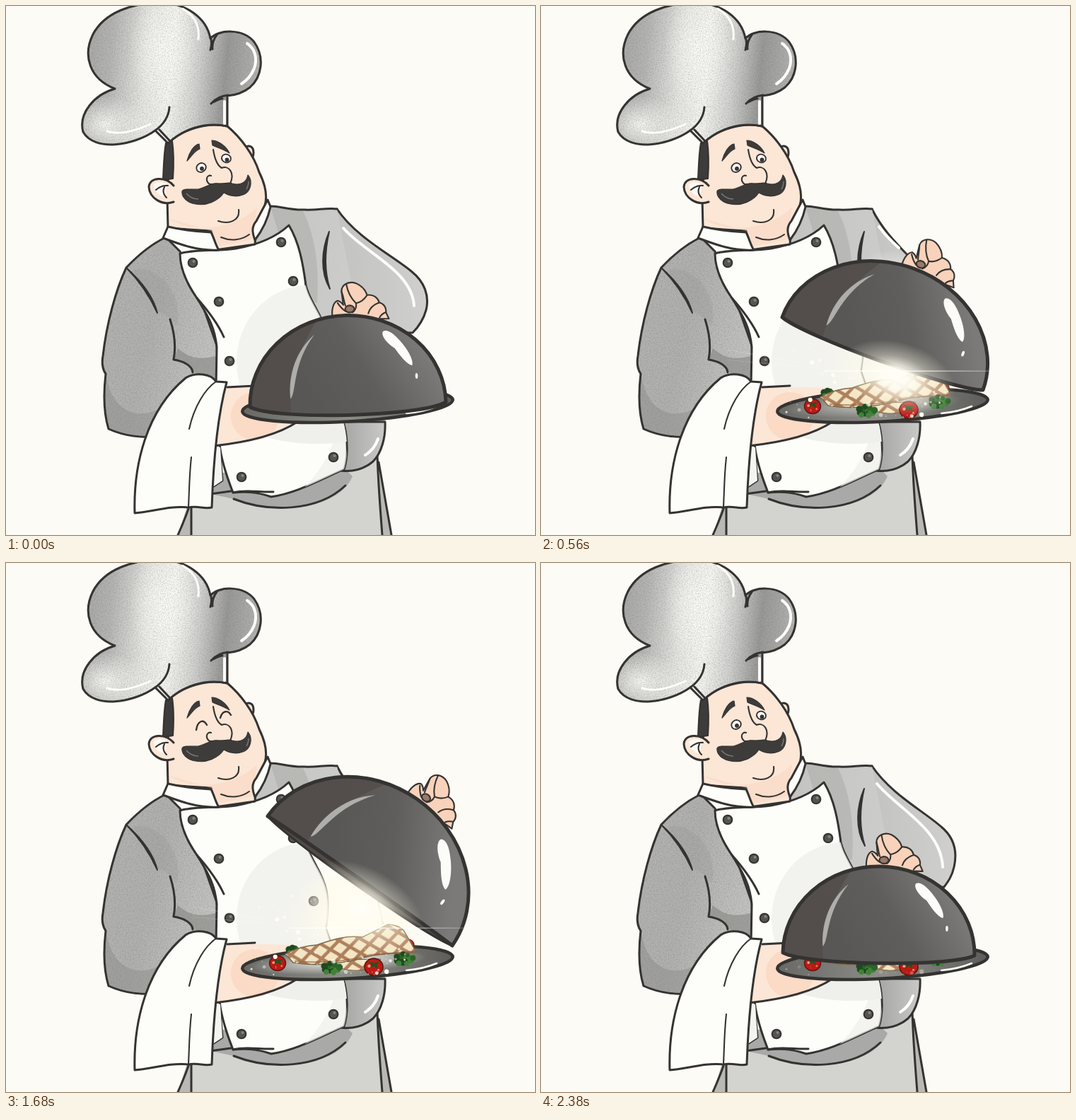
An HTML page for the animation above (2520 ms loop, 748x748 px).

```html
<!DOCTYPE html>
<html lang="en">
<head>
<meta charset="utf-8">
<title>Chef lifting a cloche</title>
<style>
html, body { margin: 0; width: 100%; height: 100%; overflow: hidden; background: #fcfbf6; }
svg { display: block; width: 100vw; height: 100vh; }
.o { stroke: #343331; stroke-width: 3; stroke-linecap: round; stroke-linejoin: round; }
.l { fill: none; }
.t { stroke-width: 2.1; }
.w { fill: none; stroke: #fdfdfa; stroke-width: 4; stroke-linecap: round; }
.skin { fill: #fce6d6; }
.white { fill: #fdfdf9; }
.ink { fill: #3d3c3b; }
.lit { opacity: var(--lit); }
</style>
</head>
<body>
<svg id="stage" viewBox="0 0 748 748">
<defs>
  <linearGradient id="hat" gradientUnits="userSpaceOnUse" x1="108" y1="60" x2="362" y2="85">
    <stop offset="0" stop-color="#a6a6a4"/><stop offset=".16" stop-color="#b6b6b4"/>
    <stop offset=".36" stop-color="#e6e6e3"/><stop offset=".5" stop-color="#f5f5f1"/>
    <stop offset=".65" stop-color="#d2d2d0"/><stop offset=".8" stop-color="#999997"/>
    <stop offset="1" stop-color="#b6b6b4"/>
  </linearGradient>
  <radialGradient id="puff"><stop offset="0" stop-color="#fafaf6" stop-opacity=".9"/><stop offset="1" stop-color="#fafaf6" stop-opacity="0"/></radialGradient>
  <linearGradient id="coat" x1="0" y1=".2" x2="1" y2=".6">
    <stop offset="0" stop-color="#b3b3b1"/><stop offset=".45" stop-color="#b1b1af"/><stop offset="1" stop-color="#c6c6c4"/>
  </linearGradient>
  <linearGradient id="sleeve" x1="0" y1="0" x2="1" y2="0"><stop offset="0" stop-color="#c3c3c1"/><stop offset="1" stop-color="#cfcfcd"/></linearGradient>
  <linearGradient id="hip" x1="0" y1="0" x2="1" y2="0"><stop offset="0" stop-color="#a2a2a0"/><stop offset="1" stop-color="#c9c9c7"/></linearGradient>
  <linearGradient id="metal" gradientUnits="userSpaceOnUse" x1="-50" y1="0" x2="100" y2="-90">
    <stop offset="0" stop-color="#585755"/><stop offset=".5" stop-color="#5f5e5c"/><stop offset="1" stop-color="#7b7a78"/>
  </linearGradient>
  <linearGradient id="dish" x1="0" y1="0" x2="1" y2="0"><stop offset="0" stop-color="#686865"/><stop offset=".5" stop-color="#8d8d88"/><stop offset="1" stop-color="#5d5d5b"/></linearGradient>
  <radialGradient id="glow">
    <stop offset="0" stop-color="#fffef8"/><stop offset=".28" stop-color="#fffdf2" stop-opacity=".93"/>
    <stop offset=".6" stop-color="#fffbe9" stop-opacity=".4"/><stop offset="1" stop-color="#fffbe9" stop-opacity="0"/>
  </radialGradient>
  <radialGradient id="halo"><stop offset=".7" stop-color="#fefdf9"/><stop offset="1" stop-color="#fefdf9" stop-opacity="0"/></radialGradient>
  <linearGradient id="ray"><stop offset="0" stop-color="#fff" stop-opacity="0"/><stop offset=".5" stop-color="#fff"/><stop offset="1" stop-color="#fff" stop-opacity="0"/></linearGradient>
  <filter id="grain" x="0" y="0" width="1" height="1" color-interpolation-filters="sRGB">
    <feTurbulence type="fractalNoise" baseFrequency=".6" numOctaves="3" seed="4"/>
    <feColorMatrix values="0 0 0 0 .35  0 0 0 0 .35  0 0 0 0 .34  .6 0 0 0 -.25"/>
    <feComposite operator="in" in2="SourceGraphic" result="n"/>
    <feMerge><feMergeNode in="SourceGraphic"/><feMergeNode in="n"/></feMerge>
  </filter>
  <pattern id="grill" width="28" height="22" patternUnits="userSpaceOnUse" patternTransform="rotate(-8)">
    <rect width="28" height="22" fill="#f3e6c4"/>
    <path d="M0 0L28 22M28 0L0 22" stroke="#9c6542" stroke-width="4.6" opacity=".8"/>
  </pattern>
  <clipPath id="bibClip"><use href="#bib"/></clipPath>
  <clipPath id="hatClip"><use href="#crown"/></clipPath>
  <clipPath id="domeClip"><path id="domeCut"/></clipPath>
  <path id="crown" d="M229 194L211 176C180 198 125 206 109 178C102 152 125 125 154 117C118 103 108 70 123 40C140 8 180 -4 215 -4C255 -6 284 18 289 46C300 33 335 31 351 51C366 72 362 100 345 115C335 123 325 126 313 127L313 170C280 163 250 175 229 194Z"/>
  <path id="jacket" d="M226 327C205 337 186 353 170 370C155 402 142 450 137 495C135 505 137 515 141 520C138 545 138 575 145 598C165 607 190 613 235 607L303 560L298 480L270 400L246 347Z"/>
</defs>
<rect width="748" height="748" fill="#fcfbf6"/>

<!-- trousers -->
<path d="M262 690L262 748L531 748L525 630Z" fill="#d3d3cf"/>
<path d="M262 690L243 748L262 748ZM525 634L532 748L545 748Z" fill="#b8b8b4"/>
<path class="o l" d="M258 711Q252 728 243 748M262 708V748M525 634C526 670 529 710 532 748M527 645L545 748"/>

<!-- right side of the coat and raised arm -->
<path id="arm" class="o" fill="url(#sleeve)"/>
<path id="shine" class="w" stroke-width="6"/>
<path d="M350 330L374 283C388 283 402 289 422 288C438 289 455 285 468 287L490 400L520 460L533 510L536 590L440 600Z" fill="url(#sleeve)"/>
<path d="M374 284L420 290Q445 340 440 420L425 415L418 350L400 311L385 320Z" fill="#b2b2b0" opacity=".7"/>
<path class="o l" d="M374 283C388 283 402 289 422 288C438 289 455 285 468 287"/>
<path class="o" fill="#343331" d="M457 319C446 345 444 376 458 400C450 375 451 345 457 319Z" style="stroke-width:2"/>
<ellipse class="lit" cx="496" cy="462" rx="88" ry="118" fill="url(#halo)"/>
<path class="o l t" d="M523 465L533 510"/>

<!-- left side of the coat -->
<use href="#jacket" fill="url(#coat)" filter="url(#grain)"/>
<path d="M141 520C138 545 138 575 145 598C165 607 190 612 205 607L216 570C185 585 150 575 141 520Z" fill="#858583" opacity=".4"/>
<path d="M264 517C262 507 250 502 237 500L243 484Q265 504 296 495L298 532Z" fill="#858583" opacity=".6"/>
<path d="M180 374C195 365 225 380 238 410C250 440 240 465 235 443L212 430Z" fill="#878785" opacity=".2"/>
<use href="#jacket" class="o l"/>
<path class="o l" d="M232 443C239 465 240 485 237 500C250 502 263 508 264 518"/>
<path class="o" fill="#343331" style="stroke-width:2" d="M170 370C190 388 208 410 214 434C204 412 190 390 170 370Z"/>

<!-- hem and bib -->
<path d="M290 690L304 660L480 655L490 665C470 712 380 722 322 697Z" fill="#a9a9a7"/>
<path class="o l" d="M322 697C370 716 440 716 480 678"/>
<path class="o" fill="url(#hip)" d="M470 588L536 588C537 610 531 632 519 644C506 655 490 659 474 657Z"/>
<path class="w" d="M526 612Q521 627 508 635"/>
<path id="bib" class="o white" d="M246 350C270 343 300 347 325 343C360 337 385 324 400 310C415 335 420 365 424 395C429 418 447 435 453 463C457 482 455 500 452 516L478 592C484 615 483 640 478 655C440 672 410 689 375 694C352 686 335 687 321 688C312 665 304 640 302 620L297 540L298 482C295 452 285 438 270 413C256 393 246 372 246 350Z"/>
<g clip-path="url(#bibClip)" fill="#efefec">
  <ellipse cx="428" cy="503" rx="102" ry="108" opacity=".75"/>
  <ellipse cx="440" cy="580" rx="110" ry="39"/>
  <path d="M478 592L484 660L420 683Q462 640 470 590Z" opacity=".7"/>
</g>
<path class="o l" d="M270 413C285 430 300 450 308 468M321 688C340 683 358 688 378 687"/>
<g id="buttons"></g>

<!-- forearm and cloth -->
<path class="skin" d="M312 538L410 540L412 588C388 606 350 617 292 622Z"/>
<circle cx="352" cy="580" r="34" fill="#f6c6ab" opacity=".38"/>
<path class="o l" d="M313 539L352 537M294 622C340 617 385 606 412 588M302 625L306 671L291 681M289 690L318 686"/>
<path d="M294 622L303 624L306 671L291 681Z" fill="#f4f4f1"/>
<path class="o white" d="M182 717C180 650 198 572 254 526C268 517 290 520 297 531L312 532C303 565 294 620 291 709C280 712 272 706 258 709C230 706 205 716 182 717Z"/>
<path class="o l t" d="M297 531C282 541 266 566 259 598M262 638C259 665 259 690 258 708"/>

<!-- head -->
<path class="o skin" d="M337 203C340 195 350 197 350 207C350 215 346 218 342 216"/>
<path class="o skin" d="M232 190C250 176 285 163 313 170C332 186 350 210 358 235C367 253 370 268 366 282L354 305L352 337L296 345L290 318L229 314L228 272Z"/>
<path d="M229 300C260 322 320 318 355 285L348 330L300 340L290 318Z" fill="#f6cfb6" opacity=".4"/>
<path class="o white" d="M229 312C250 317 270 319 290 320C295 330 297 340 301 345C272 347 246 337 222 328Z"/>
<path class="o white" d="M370 274L374 284C370 302 362 318 352 331C348 320 347 312 354 304Z"/>
<path class="ink o t" d="M226 194L235 191C238 212 237 230 236 244L222 246C223 228 223 210 226 194Z"/>
<path class="o skin" d="M237 254C226 241 203 241 202 256C203 271 220 283 237 277"/>
<path d="M209 252Q218 246 228 252L224 270Q210 266 209 252Z" fill="#fff9f3"/>
<path class="o l t" d="M212 260Q220 253 229 254M224 256Q220 264 227 271M300 304C315 309 331 304 329 288M304 327C318 333 333 331 344 323"/>
<path class="ink o" style="stroke-width:1.2" d="M256 219C259 207 266 196 273 195L274 202C266 205 262 213 256 219ZM291 190C300 190 311 198 316 208C306 202 298 200 292 197Z"/>
<g id="open" class="o" style="stroke-width:1.9">
  <ellipse fill="#fefefc" cx="276" cy="228.5" rx="7" ry="6.2" transform="rotate(-35 276 228.5)"/><circle class="ink" cx="277" cy="230" r="2"/>
  <ellipse fill="#fefefc" cx="311.500" cy="215.500" rx="6.600" ry="5.800" transform="rotate(20 311.5 215.500)"/><circle class="ink" cx="312.500" cy="217.500" r="2"/>
</g>
<path id="happy" class="o l" style="stroke-width:2.4" d="M269 236C271 223 279 220 284 229M303 219C306 208 314 208 318 215"/>
<path class="o skin t" d="M293 203C295 216 298 225 305 229C315 225 324 236 317 251L288 252C280 246 285 238 290 240"/>
<path class="ink o" style="stroke-width:1.2" d="M249 262C251 257 262 260 272 259C284 256 291 249 300 251C307 253 312 248 320 251C331 254 340 250 342 239C349 247 347 263 335 267C324 271 315 268 308 264C300 276 283 283 268 280C256 278 248 270 249 262Z"/>
<path d="M255 265C260 271 266 273 272 273M340 259Q343 254 343 248" fill="none" stroke="#777" stroke-width="1.5"/>

<!-- hat -->
<g filter="url(#grain)"><g clip-path="url(#hatClip)">
  <use href="#crown" fill="url(#hat)"/>
  <ellipse cx="140" cy="168" rx="56" ry="42" fill="url(#puff)"/>
  <ellipse cx="222" cy="62" rx="48" ry="85" fill="url(#puff)"/>
</g></g>
<use href="#crown" class="o l"/>
<path class="o l" d="M289 44Q292 52 289 62M298 41Q291 50 292 61M290 138C297 130 305 127 314 126M293 136Q302 131 306 131M231 143C230 158 222 168 211 176M217 175L231 190"/>
<path class="w" d="M341 53C352 60 356 74 351 88C347 98 341 105 333 110M309 135V166"/>
<path class="w" style="stroke-width:3" d="M143 177C160 183 184 176 204 167M250 4C266 13 274 28 272 47"/>

<!-- plate and meal -->
<g transform="rotate(-3.2 483 565)">
  <ellipse class="o" cx="483" cy="565" rx="149" ry="22.500" fill="url(#dish)" style="stroke-width:4.5"/>
  <ellipse class="lit" cx="470" cy="563" rx="125" ry="17" fill="url(#puff)"/>
</g>
<path class="w" style="stroke-width:2.5" d="M566 576Q590 574 609 566"/>
<ellipse class="lit" cx="490" cy="505" rx="112" ry="72" fill="url(#glow)"/>
<g id="food">
  <g id="rear"></g>
  <path d="M440 562L530 560L522 573Q490 580 470 572Z" fill="url(#grill)" stroke="#7d5a3c"/>
  <path d="M395 553C410 544 425 541 440 540C458 534 478 526 504 529L540 511Q555 512 562 519L580 550C560 553 535 550 510 557C480 566 440 571 406 565Z" fill="url(#grill)" stroke="#7d6745" stroke-width="1.5"/>
  <path d="M408 563Q470 568 515 554L578 549" fill="none" stroke="#8a5a38" stroke-width="2" opacity=".6"/>
  <g id="front"></g>
</g>
<g id="sparks" fill="#fffef4"></g>

<!-- cloche -->
<g id="dome">
  <g id="hand" class="o t">
    <path fill="#f8d2ba" d="M-25 -34C-25 -44 -14 -49 -4 -45C4 -41 9 -35 11 -28C20 -29 26 -24 28 -17C35 -15 38 -9 37 -3L41 6L-38 6C-41 -8 -37 -19 -31 -21C-27 -20 -25 -18 -23 -15Z"/>
    <path class="l" d="M-25 -34C-22 -25 -22 -20 -20 -14M-18 -44C-16 -32 -12 -24 -5 -17M11 -28C7 -22 2 -18 -5 -17C-4 -11 -6 -7 -10 -4M28 -17C19 -14 14 -9 12 -2M37 -3Q31 -1 28 4M-31 -18Q-26 -10 -20 -6"/>
    <ellipse cx="-14" cy="-9" rx="6.500" ry="5" fill="#98796a"/>
  </g>
  <path id="inside" class="o" fill="#514a47"/>
  <g id="motes" fill="#fff"></g>
  <path id="shell" fill="url(#metal)"/>
  <g clip-path="url(#domeClip)"><g id="marks">
    <path d="M-160 40V-140H-28C-62 -90 -82 -50 -81 -5L-80 40Z" fill="#504845" opacity=".6"/>
    <path d="M-45 -100C-70 -80 -84 -45 -81 -10C-72 -18 -78 -58 -45 -100Z" fill="#aeaeab"/>
    <path d="M52 -102C58 -106 68 -98 76 -88C88 -74 95 -58 92 -53C84 -55 75 -68 68 -78C56 -86 49 -97 52 -102Z" fill="#fbfbf8"/>
    <ellipse cx="98" cy="-38" rx="1.800" ry="4" fill="#fbfbf8"/>
  </g></g>
  <path id="edge" class="o l" style="stroke-width:5"/>
</g>
<ellipse id="flare" fill="url(#glow)"/>
<path id="rays" fill="url(#ray)" d="M250 483L400 510L250 484.500ZM262 500L420 514L262 501ZM400 515.500H690V517H400Z"/>
<g id="facial" fill="#fff">
  <circle cx="270" cy="242" r="2"/><circle cx="281" cy="271" r="2.600"/><circle cx="348" cy="268" r="2"/><circle cx="268" cy="266" r="1.400"/><circle cx="333" cy="297" r="1.600"/>
  <path d="M237 190Q275 165 311 171" class="w" style="stroke-width:1.6"/>
</g>
</svg>
<script>
const $ = id => document.getElementById(id);
const set = (id, attrs) => { for (const k in attrs) $(id).setAttribute(k, attrs[k]); };

let seed = 7;
const rnd = () => (seed = seed * 16807 % 2147483647) / 2147483647;

const button = ([x, y], i) =>
  `<g id="b${i}"><circle class="o t" cx="${x}" cy="${y}" r="6.3" fill="#555452"/><circle cx="${x + 1.5}" cy="${y - 2}" r="2" fill="#858481"/></g>`;
$('buttons').innerHTML = [[264, 363], [301, 418], [316, 502], [389, 334], [406, 389], [435, 478], [333, 666], [463, 638]].map(button).join('');

const tomato = (x, y, r) => `<g transform="translate(${x} ${y}) scale(${r / 12})">
  <ellipse rx="12" ry="11" fill="#bd1a15" stroke="#5c1712" stroke-width="1.5"/>
  <path d="M0 -5L-7 -7L-3 -3L-6 2L0 -1L5 3L4 -3L8 -6Z" fill="#24521f"/>
  <circle cx="-6" cy="-1" r="2" fill="#ff9a8c"/><circle cx="6" cy="4" r="1.5" fill="#f27a6a"/></g>`;

function broccoli(x, y, w, h) {
  let s = '';
  for (let i = 0; i < 16; i++) {
    const a = i * 2.4, d = Math.sqrt(i / 16);
    s += `<circle cx="${x + Math.cos(a) * d * w}" cy="${y + Math.sin(a) * d * h}" r="${3 + rnd() * 2}" fill="${['#1f4a20', '#2c6429', '#428238'][i % 3]}"/>`;
  }
  return s;
}
$('rear').innerHTML = broccoli(406, 548, 8, 4) + tomato(568, 540, 9);
$('front').innerHTML = tomato(384, 566, 11.5) + broccoli(460, 573, 13, 7) + tomato(520, 571, 13) + broccoli(563, 560, 14, 8);

const dot = (x, y, r) => `<circle cx="${x}" cy="${y}" r="${r}" opacity="${.4 + rnd() * .6}"/>`;
let dots = '';
for (let i = 0; i < 75; i++) {
  const low = i < 50;
  dots += dot(335 + rnd() * (low ? 230 : 110), low ? 545 + rnd() * 38 : 470 + rnd() * 70, .6 + rnd() ** 3 * 2.6);
}
$('sparks').innerHTML = dots;
dots = '';
for (let i = 0; i < 36; i++) {
  const x = -150 + rnd() * 270;
  dots += dot(x, (rnd() * 2 - 1) * 19 * (1 - (x / 170) ** 2), .6 + rnd() ** 3 * 2);
}
$('motes').innerHTML = dots;

// rim left, rim right, height, front bulge, back bulge, light, flare (opacity, x, y, radius), sparks
const poses = [
  [345, 567, 622, 560, 126, 15, 15, 0, 0, 440, 530, 40, 0],
  [342, 551, 613, 555, 124, 13, 13, 0, 0, 440, 530, 40, .35],
  [335, 518, 606, 552, 120, 17, 17, 0, 0, 440, 530, 40, .5],
  [335, 478, 607, 545, 125, 14, 14, .25, .35, 440, 528, 45, .8],
  [341, 440, 625, 543, 128, 11, 11, .6, 1, 503, 526, 85, 1],
  [354, 400, 628, 542, 134, 5, 8, .85, 1, 502, 504, 90, 1],
  [370, 358, 631, 541, 141, -2, 8, 1, 1, 502, 487, 95, 1],
  [385, 312, 633, 537, 153, -27, 25, 1, 0, 500, 480, 95, 1]
];
const mid = 'M468 287C495 327 540 350 566 373C584 388 589 408 584 430C581 443 576 450 570 458L470 462';
const arms = [
  'M468 287C495 327 545 352 573 375C592 390 599 410 594 430C590 444 583 454 575 462L470 462',
  mid, mid,
  'M468 287C490 324 525 351 552 373C576 392 588 412 584 440L470 440',
  'M468 287C482 315 500 333 520 354L560 400L480 400'
];
const midShine = 'M475 312C505 348 566 376 568 430';
const shines = [
  'M477 314C508 350 574 374 577 424', midShine, midShine,
  'M475 312C490 332 510 346 522 356M556 390Q567 402 566 425', 'M478 312Q490 328 506 342'
];

function show(i) {
  const [lx, ly, rx, ry, h, b, b2, light, flare, fx, fy, fr, sparks] = poses[i];
  const a = Math.hypot(rx - lx, ry - ly) / 2;
  const turn = Math.atan2(ry - ly, rx - lx) * 180 / Math.PI;
  const rim = (k, dir) => `C${dir * a * .75} ${k * 1.33} ${-dir * a * .75} ${k * 1.33} ${-dir * a} 0`;
  const shell = `M${-a} 0A${a} ${h} 0 0 1 ${a} 0${rim(b, 1)}Z`;
  for (const id of ['shell', 'edge', 'domeCut']) set(id, { d: shell });
  set('inside', { d: `M${-a} 0${rim(b, -1)}${rim(b2, 1)}Z` });
  set('dome', { transform: `translate(${(lx + rx) / 2} ${(ly + ry) / 2}) rotate(${turn})` });
  set('marks', { transform: `scale(${a / 138.5} ${h / 126})` });
  set('hand', { transform: `translate(${a * .144} ${-h})` });
  set('arm', { d: arms[Math.min(i, 4)] });
  set('shine', { d: shines[Math.min(i, 4)] });
  $('stage').style.setProperty('--lit', light);
  set('flare', { opacity: flare, cx: fx, cy: fy, rx: fr, ry: fr * .6, transform: `rotate(${turn * .8} ${fx} ${fy})` });
  set('sparks', { opacity: sparks });
  const on = (id, yes) => set(id, { opacity: yes ? 1 : 0 });
  on('food', i > 0);
  on('rays', i > 3);
  on('open', i < 6);
  on('happy', i > 5);
  on('motes', i > 6);
  on('facial', i > 6);
  on('b4', i < 7);
}

// seven steps up, a rest at the top, then back down
const step = 140, rest = 1680, loop = 2520;
const poseAt = t => t < rest ? Math.min(7, Math.floor(t / step)) : 6 - Math.floor((t - rest) / step);

let last = -1;
function tick() {
  const i = poseAt(performance.now() % loop);
  if (i !== last) show(last = i);
  requestAnimationFrame(tick);
}
tick();
</script>
</body>
</html>
```
